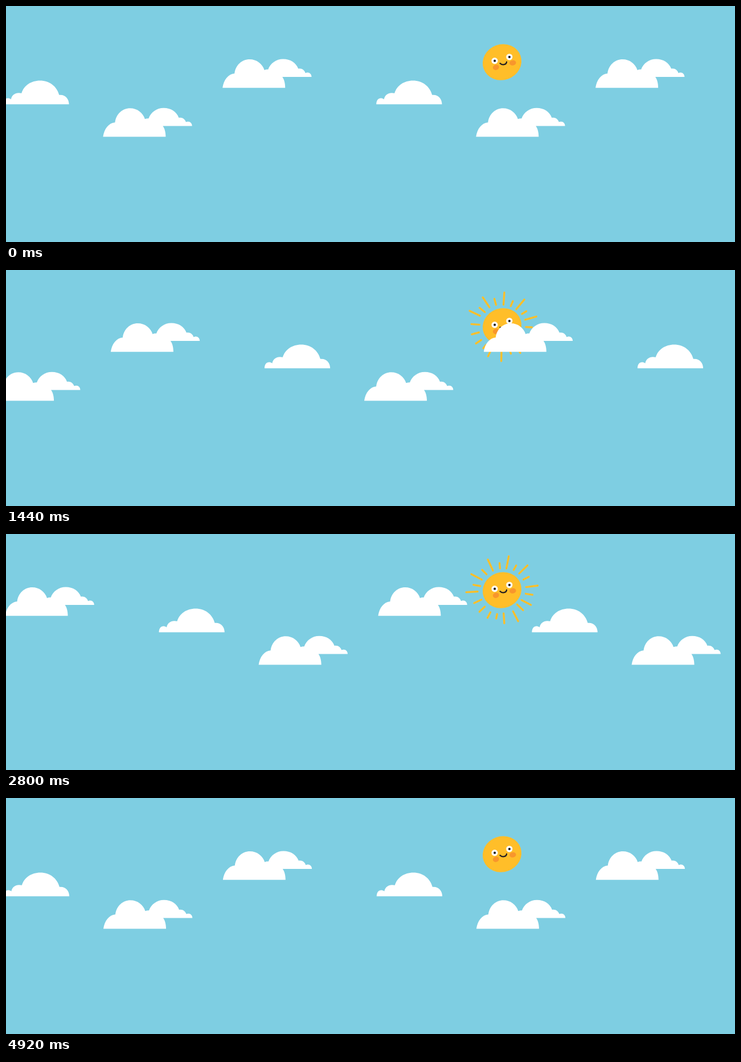
Write an HTML page with a canvas that moves like this. It is 1280x416 px and loops after 4960 ms.

```html
<!DOCTYPE html>
<html lang="en">
<head>
<meta charset="utf-8">
<title>Sunny sky</title>
<style>
  html, body { margin: 0; width: 100%; height: 100%; overflow: hidden; background: #7ecee2; }
  canvas { display: block; }
</style>
</head>
<body>
<canvas id="sky" width="1280" height="416"></canvas>
<script>
const ctx = document.getElementById('sky').getContext('2d');
const LOOP = 124, STEP = 40;        // loop length in steps, ms per step
const SPACING = 654.9, TRAVEL = 654.3, TRAVEL_STEPS = 120;
const SUN = { x: 871, y: 99 };

const pair = new Path2D(`M0 50.3C2 36 10 26 21 25C23 10 34 0 47.5 0C60 0 70 8 73.5 19
  C76 18 78 17.6 80 18C84 7 94-.5 106.5-.5C119-.5 129 6 133 16.6C139 15.4 144 19 145.5 24.3
  C151 21.5 156.3 25.3 156.3 31.1L105 31.1C108.5 36 110 43 110 50.3Z`);
const single = new Path2D(`M0 41.8C0 32 7 28.5 13.5 33C15 24 23 20 32 22.3
  C36 8.5 49 0 64.3 0C81 0 94 10 98 25.3C108 24 115.3 31.5 115.3 41.8Z`);

// first copy of each cloud: shape, x, y
const clouds = [[pair, 380.2, 94], [pair, 170.4, 180.3], [single, -4.7, 131.5]];

// angle (degrees, counter-clockwise), inner radius, outer radius
const rays = [
  [150, 42, 64], [136, 38, 52], [119, 39, 62], [101, 38, 51], [81.5, 37, 60.5],
  [62, 37.5, 49], [45.5, 38, 62], [27, 40, 51], [11, 41, 63.5], [-6.8, 41, 53.5],
  [-26, 41.5, 64], [-42, 41, 55], [-60.5, 37.5, 58], [-77, 35.5, 52], [-96, 41, 62.5],
  [-119.5, 40, 59.5], [-135, 42, 52], [-151, 43, 56], [-169.5, 41, 56], [171.5, 39, 55]
];

const rad = d => d * Math.PI / 180;
const clamp = v => Math.min(1, Math.max(0, v));
const ease = v => v * v * (3 - 2 * v);

// rises over steps a..b, falls over c..d
const swell = (n, a, b, c, d) => Math.min(clamp((n - a) / (b - a)), clamp((d - n) / (d - c)));

function blob(x, y, rx, ry, tilt, color) {
  ctx.fillStyle = color;
  ctx.beginPath();
  ctx.ellipse(x, y, rx, ry, rad(tilt), 0, 2 * Math.PI);
  ctx.fill();
}

function drawRays(n) {
  const grow = swell(n, 0, 30, 90, 120);
  if (!grow) return;
  const scale = 0.4 + 0.6 * ease(grow);
  const turn = 45 * ease(swell(n, 30, 60, 60, 90));
  ctx.save();
  ctx.translate(SUN.x, SUN.y);
  ctx.rotate(-rad(turn));
  ctx.scale(scale, scale);
  ctx.globalAlpha = grow;
  ctx.strokeStyle = '#fbbf2b';
  ctx.lineWidth = 3.4;
  ctx.lineCap = 'round';
  ctx.beginPath();
  for (const [deg, from, to] of rays) {
    const c = Math.cos(rad(deg)), s = -Math.sin(rad(deg));
    ctx.moveTo(c * (from + 1), s * (from + 1));
    ctx.lineTo(c * (to - 1), s * (to - 1));
  }
  ctx.stroke();
  ctx.restore();
}

function drawSun() {
  blob(SUN.x, SUN.y, 34.4, 31.4, -20, '#ffbe29');
  blob(860.3, 108.1, 5.6, 4.7, -18, '#f8962c');
  blob(889.8, 100.2, 5.8, 4.6, -8, '#f8962c');
  for (const [x, y] of [[858, 96.6], [883.8, 89.8]]) {
    blob(x, y, 5.6, 5.6, 0, '#fff');
    blob(x + 0.1, y + 0.1, 2.1, 2.1, 0, '#1f1f1f');
  }
  ctx.strokeStyle = '#262222';
  ctx.lineWidth = 2.3;
  ctx.lineCap = 'round';
  ctx.beginPath();
  ctx.moveTo(867.5, 101);
  ctx.bezierCurveTo(871, 104.8, 878.5, 103.8, 879, 98.6);
  ctx.stroke();
}

function drawClouds(n) {
  const shift = TRAVEL * clamp(n / TRAVEL_STEPS);
  ctx.fillStyle = '#fff';
  for (const [shape, x, y] of clouds) {
    for (let copy = 0; copy < 3; copy++) {
      ctx.save();
      ctx.translate(x + copy * SPACING - shift, y);
      ctx.fill(shape);
      ctx.restore();
    }
  }
}

function draw() {
  const n = Math.floor((performance.now() + 1) / STEP) % LOOP;
  ctx.fillStyle = '#7ecee2';
  ctx.fillRect(0, 0, 1280, 416);
  drawRays(n);
  drawSun();
  drawClouds(n);
  requestAnimationFrame(draw);
}
draw();
</script>
</body>
</html>
```
